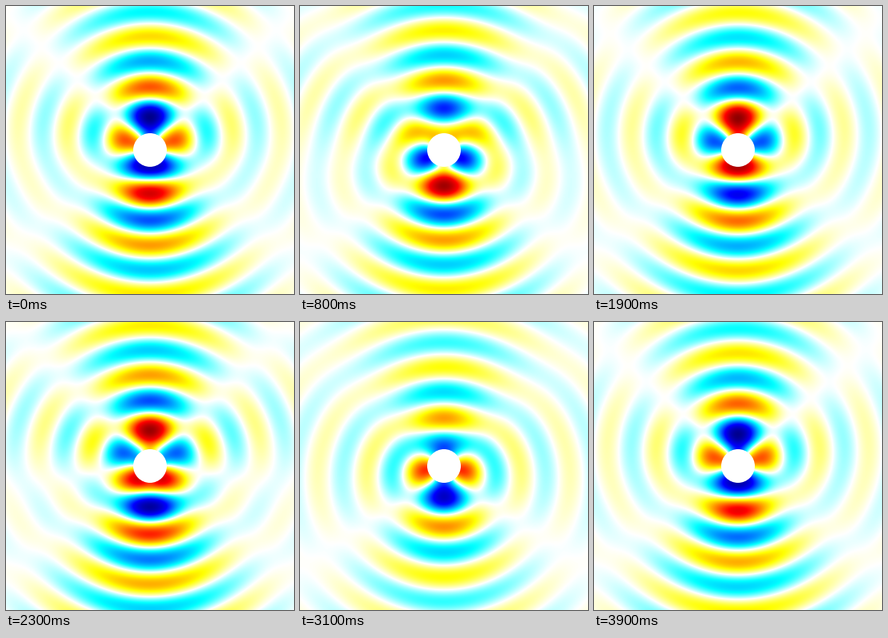
Recreate the animation shown at these times as a matplotlib script. Size 360 by 360 pixels, loop 4 s.

```python
import numpy as np
import matplotlib.pyplot as plt
from matplotlib.animation import FuncAnimation
from matplotlib.colors import LinearSegmentedColormap
from numpy.polynomial import legendre

SIZE = 360
FRAMES = 40
RADIUS = 21.0             # sphere radius in pixels
K = 2 * np.pi / 60        # wavenumber per pixel
ORDERS = 3                # highest partial wave
START = np.radians(58)
LIMIT = 2.1


def hankels(x):
    """Outgoing spherical Hankel functions of orders 0 to ORDERS."""
    wave = np.exp(1j * x)
    h = [-1j * wave / x, -wave * (x + 1j) / x ** 2]
    for n in range(1, ORDERS):
        h.append((2 * n + 1) / x * h[n] - h[n - 1])
    return h


def slopes(x):
    h = hankels(x)
    return [-h[1]] + [h[n - 1] - (n + 1) / x * h[n] for n in range(1, ORDERS + 1)]


def wave_field():
    """Upward wave plus its reflection from a sound-hard sphere."""
    axis = np.arange(SIZE) - (SIZE - 1) / 2
    x, y = np.meshgrid(axis, axis)
    r = np.maximum(np.hypot(x, y), RADIUS - 2)
    field = np.zeros(r.shape, complex)
    for n, (h, slope) in enumerate(zip(hankels(K * r), slopes(K * RADIUS))):
        radial = h.real - slope.real / slope * h
        angular = legendre.legval(-y / r, [0] * n + [1])
        field += (2 * n + 1) * 1j ** n * radial * angular
    return field


def make_cmap():
    stops = [(-LIMIT, (0, 0, 0.5)), (-1.3, (0, 0, 1)), (-0.43, (0, 1, 1)),
             (0, (1, 1, 1)),
             (0.43, (1, 1, 0)), (1.3, (1, 0, 0)), (LIMIT, (0.5, 0, 0))]
    return LinearSegmentedColormap.from_list(
        "wave", [((v + LIMIT) / (2 * LIMIT), c) for v, c in stops], N=1024)


field = wave_field()


def snapshot(i):
    return (field * np.exp(-1j * (2 * np.pi * i / FRAMES + START))).real


fig = plt.figure(figsize=(SIZE / 100, SIZE / 100), dpi=100, facecolor="white")
ax = fig.add_axes([0, 0, 1, 1])
ax.axis("off")
image = ax.imshow(snapshot(0), cmap=make_cmap(), vmin=-LIMIT, vmax=LIMIT,
                  extent=(0, SIZE, SIZE, 0), interpolation="nearest")
ax.add_patch(plt.Circle((SIZE / 2, SIZE / 2), RADIUS, color="white", lw=0))


def update(i):
    image.set_data(snapshot(i))
    return [image]


anim = FuncAnimation(fig, update, frames=FRAMES, interval=100, repeat=True)
plt.show()
```
